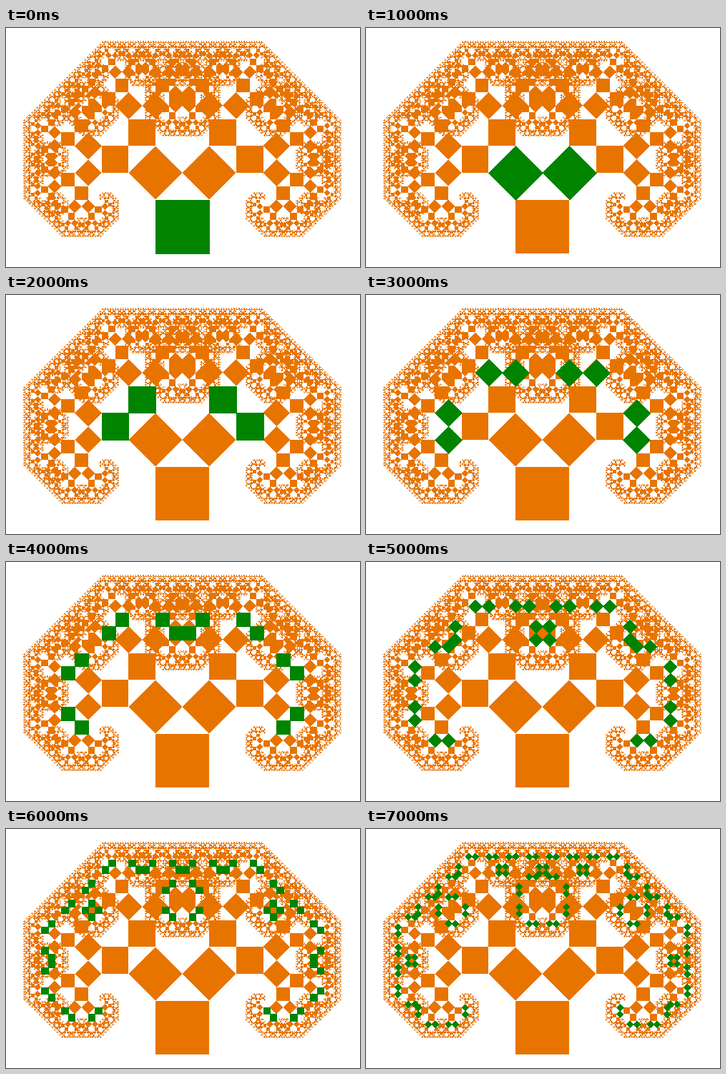
An HTML page for the animation above (8 s loop, 495x335 px).

```html
<!DOCTYPE html>
<html lang="en">
<head>
<meta charset="utf-8">
<title>Pythagoras tree</title>
<style>
  html, body { margin: 0; width: 100%; height: 100%; overflow: hidden; background: #fff; }
  svg { display: block; width: 495px; height: 335px; }
</style>
</head>
<body>
<svg viewBox="0 0 495 335" shape-rendering="crispEdges">
  <path id="tree" fill="#e87400"/>
  <path id="lit" fill="#008400" stroke="#008400" stroke-width="1" transform="translate(.5 .5)"/>
</svg>
<script>
const DEPTH = 13, STEPS = 8, STEP_MS = 1000;
const SIDE = 75.25, CENTER = 246.65, BASE = 315.8;
const tree = document.getElementById('tree');
const lit = document.getElementById('lit');

// A square stands on the edge from (x, y) along (ux, uy).
function squarePath([x, y, ux, uy]) {
  const n = v => v.toFixed(3);
  return `M${n(x)} ${n(y)}l${n(ux)} ${n(uy)} ${n(uy)} ${n(-ux)} ${n(-ux)} ${n(-uy)}z`;
}

// Two smaller squares on the legs of a right isosceles triangle.
function branch([x, y, ux, uy]) {
  const vx = uy, vy = -ux;
  const left = [x + vx, y + vy, (ux + vx) / 2, (uy + vy) / 2];
  const right = [left[0] + left[2], left[1] + left[3], (ux - vx) / 2, (uy - vy) / 2];
  return [left, right];
}

const levels = [];
let row = [[CENTER - SIDE / 2, BASE, SIDE, 0]];
for (let i = 0; i < DEPTH; i++) {
  levels.push(row.map(squarePath).join(''));
  row = row.flatMap(branch);
}
tree.setAttribute('d', levels.join(''));

let shown = -1;
function render(ms) {
  const level = Math.floor(ms / STEP_MS) % STEPS;
  if (level === shown) return;
  shown = level;
  lit.setAttribute('d', levels[level]);
}

const start = performance.now();
function tick() {
  render(performance.now() - start);
  requestAnimationFrame(tick);
}
tick();
</script>
</body>
</html>
```
